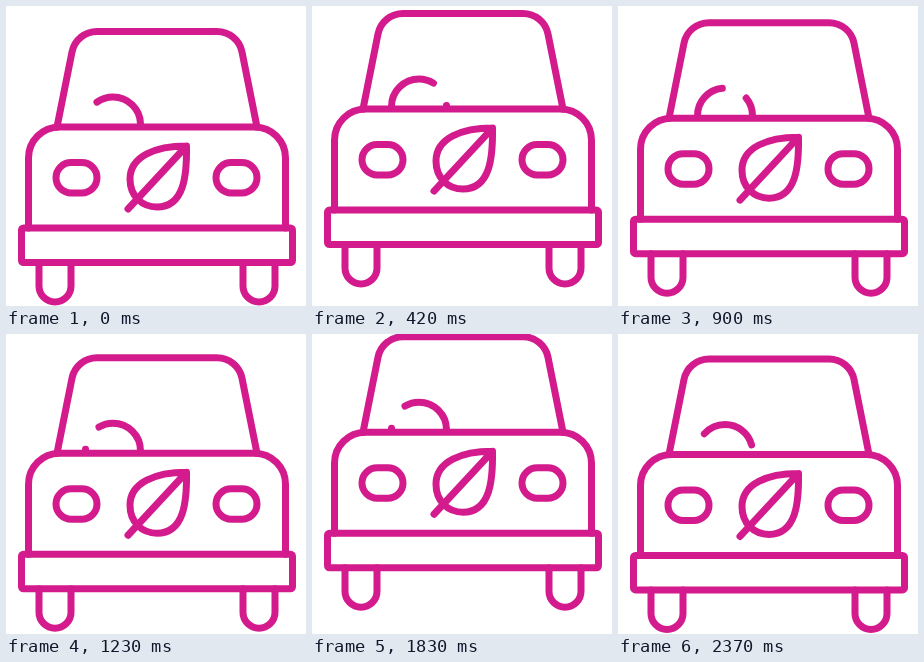
Write an HTML page that moves like this. It is 300 px wide and 300 px high and loops after 2400 ms.

```html
<!DOCTYPE html>
<html lang="en">
<head>
<meta charset="utf-8">
<title>Bouncing eco car</title>
<style>
  html, body { margin: 0; height: 100%; overflow: hidden; background: #fff; }
  svg { display: block; width: 100%; height: 100%; }
  #car { fill: none; stroke: #d41b8e; stroke-width: 7; stroke-linecap: round; stroke-linejoin: round; }
</style>
</head>
<body>
<svg viewBox="0 0 300 300">
  <g id="car">
    <path d="M51 121 L66 46 A25.5 25.5 0 0 1 91 25.5 H211 A25.5 25.5 0 0 1 236 46 L251 121"/>
    <path id="steering" pathLength="180" stroke-dasharray="124 56" d="M79.5 118.5 a27.5 27.5 0 0 1 55 0"/>
    <path d="M22.5 222 V152 a31 31 0 0 1 31 -31 H248.5 a31 31 0 0 1 31 31 V222"/>
    <rect x="15.5" y="222" width="271" height="34.5" rx="2"/>
    <path d="M33 256.5 V280 a16 16 0 0 0 32 0 V256.5 M237 256.5 V280 a16 16 0 0 0 32 0 V256.5"/>
    <rect x="50" y="156.5" width="41" height="30.5" rx="15.25"/>
    <rect x="210" y="156.5" width="41" height="30.5" rx="15.25"/>
    <path d="M180.5 140 C150 140 124 150 124 173 C124 190 136 201 151 201 C178 201 181 170 180.5 140 L122 203"/>
  </g>
</svg>
<script>
  const LOOP = 2400;
  // [time in ms, vertical shift], joined by sine easing
  const bounce = [[0, 0], [560, -21], [1160, -1], [1770, -23.5], [2290, -1], [LOOP, -0.5]];
  const car = document.getElementById('car');
  const steering = document.getElementById('steering');

  function shiftAt(t) {
    const i = bounce.findIndex(([time]) => time > t);
    const [t0, y0] = bounce[i - 1];
    const [t1, y1] = bounce[i];
    const eased = (1 - Math.cos(Math.PI * (t - t0) / (t1 - t0))) / 2;
    return y0 + (y1 - y0) * eased;
  }

  function draw() {
    const t = performance.now() % LOOP;
    car.setAttribute('transform', `translate(0 ${shiftAt(t)})`);
    // The gap in the steering wheel turns half a circle every 600 ms
    const gapEnd = 50 + 0.3 * t + 4 * Math.max(0, 1 - t / 630);
    steering.setAttribute('stroke-dashoffset', -(gapEnd % 180));
    requestAnimationFrame(draw);
  }
  draw();
</script>
</body>
</html>
```
